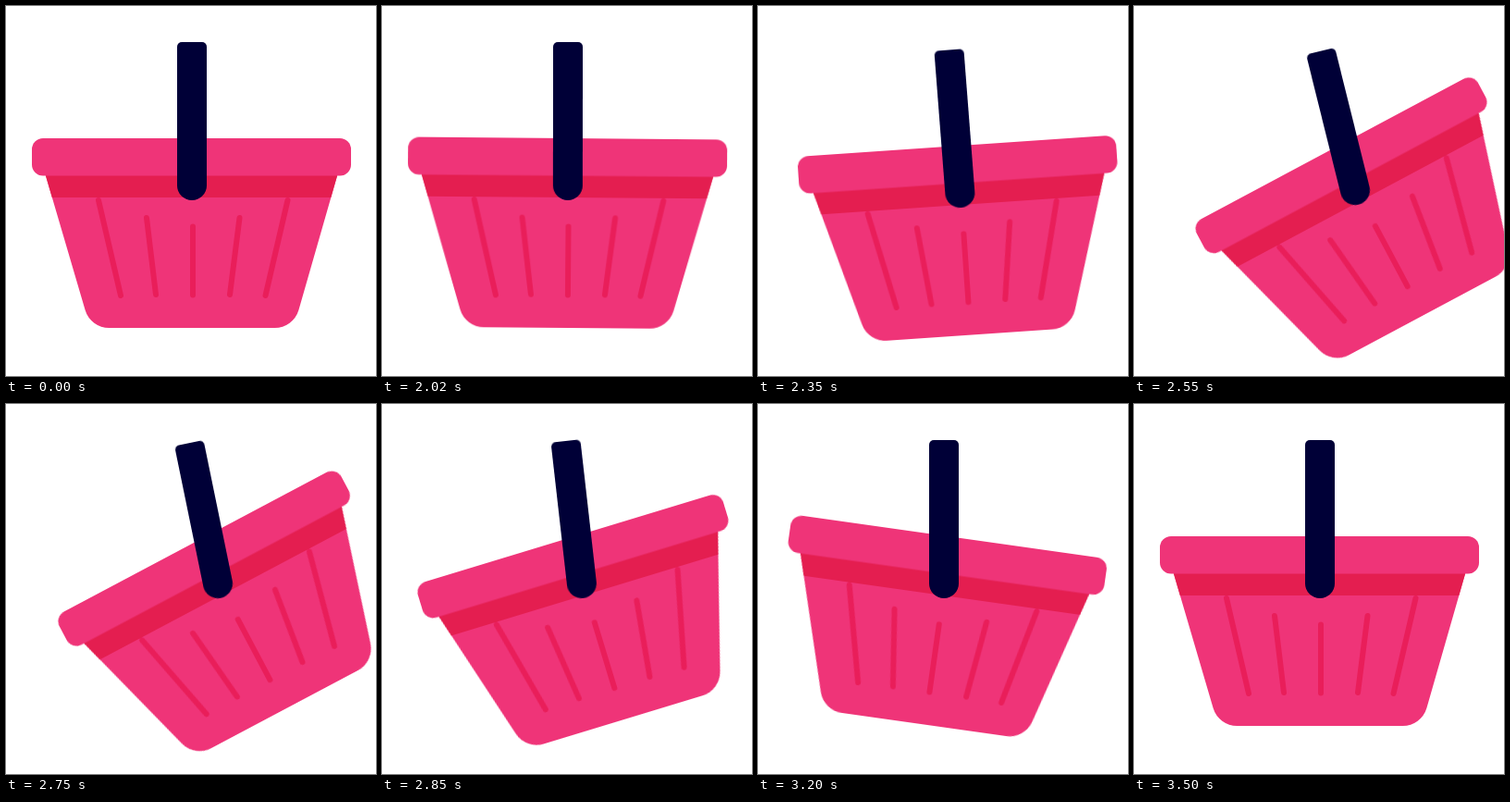
Write an HTML page that moves like this. It is 400x400 px and loops after 3520 ms.

```html
<!DOCTYPE html>
<html lang="en">
<head>
<meta charset="utf-8">
<title>Swinging basket</title>
<style>
html, body { margin: 0; height: 100%; overflow: hidden; background: #fff; }
svg { display: block; width: 100vw; height: 100vh; }

/* basket and handle both turn around the joint at 201,194 */
g, .handle {
  transform-origin: 201px 194px;
  animation: 3520ms cubic-bezier(.37, 0, .63, 1) infinite;
}
.across { animation-name: across; }
.down { animation-name: down; }
.basket { animation-name: swing; }
.handle { animation-name: tilt; fill: #000037; }
.pink { fill: #ef3478; }
.band { fill: #e41e50; }
.slots { fill: none; stroke: #e91e5a; stroke-width: 6; stroke-linecap: round; }

@keyframes across {
  0%, 56.68% { transform: translateX(0); }
  60.51% { transform: translateX(-1.5px); }
  73.58% { transform: translateX(38.7px); }
  86.51%, 100% { transform: translateX(0); }
}
@keyframes down {
  0%, 59.09% { transform: translateY(0); }
  68.18% { transform: translateY(8.5px); }
  78.12%, 100% { transform: translateY(0); }
}
@keyframes swing {
  0%, 56.68% { transform: rotate(0deg); }
  61.65% { transform: rotate(8.8deg); }
  75.28% { transform: rotate(-32.2deg); }
  88.92% { transform: rotate(8.8deg); }
  99.43%, 100% { transform: rotate(0deg); }
}
@keyframes tilt {
  0%, 56.68% { transform: rotate(0deg); }
  61.65% { transform: rotate(1.2deg); }
  74.35% { transform: rotate(-14.8deg); }
  86.65%, 100% { transform: rotate(0deg); }
}
</style>
</head>
<body>
<svg viewBox="0 0 400 400">
  <g class="across">
    <g class="down">
      <g class="basket">
        <path class="pink" d="M42.5 182L85.6 328.8A27 27 0 0 0 111.5 348H290.5A27 27 0 0 0 316.4 328.8L358.5 182Z"/>
        <path class="band" d="M42.5 182L49.8 207H351.3L358.5 182Z"/>
        <rect class="pink" x="28" y="143" width="345" height="40.5" rx="12"/>
        <path class="slots" d="M100 210L124 313M152 229L162 312M202 238.5V312.5M252.5 229L242 312M304.5 210L280.5 313"/>
      </g>
      <path class="handle" d="M190 39H212A5 5 0 0 1 217 44V194A16 16 0 0 1 185 194V44A5 5 0 0 1 190 39Z"/>
    </g>
  </g>
</svg>
</body>
</html>
```
